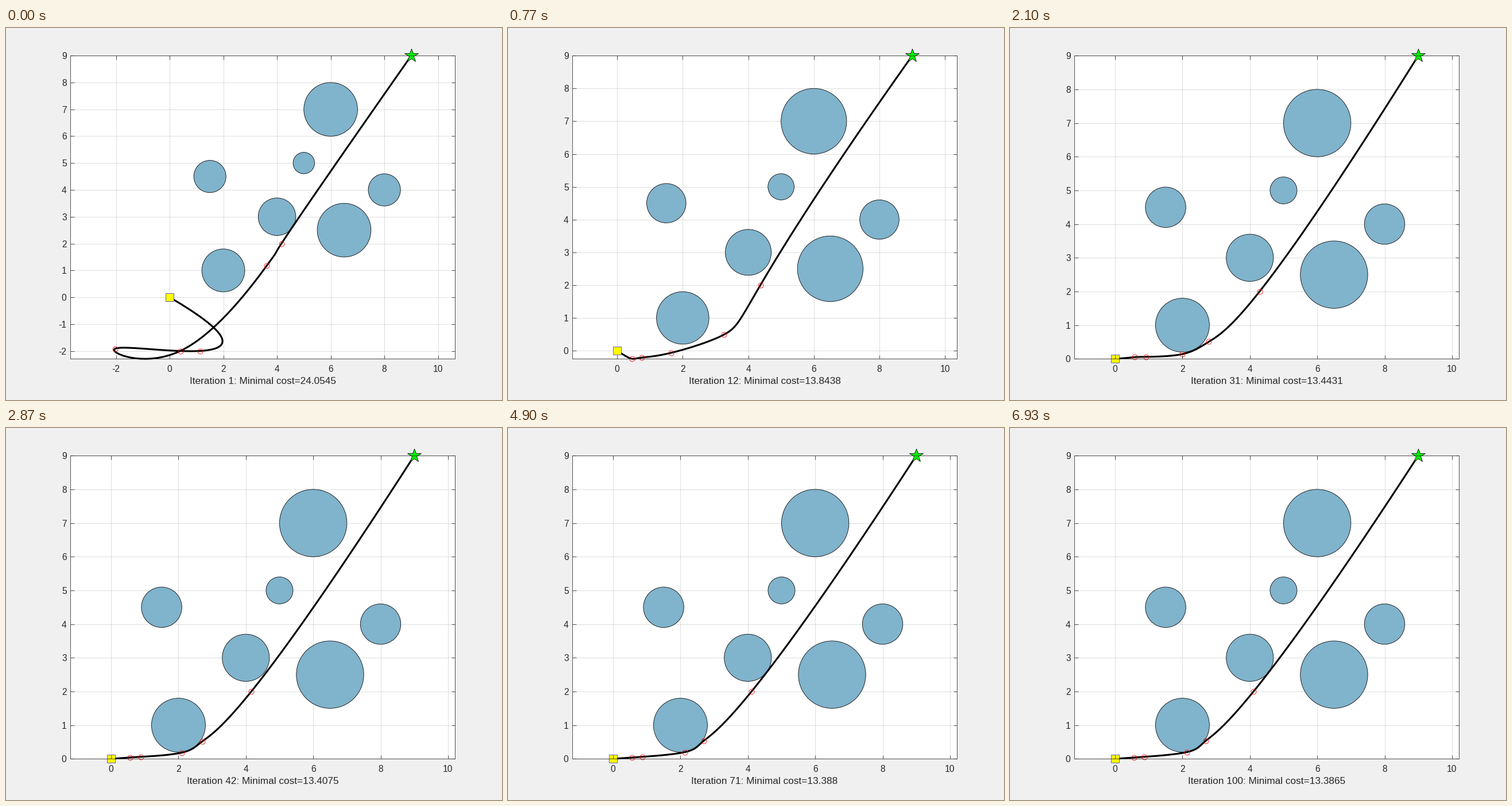
These frames come from a looping animation (864x648 px, 7 s). A matplotlib script:

```python
import numpy as np
import matplotlib.pyplot as plt
from matplotlib.animation import FuncAnimation
from matplotlib.patches import Circle
from matplotlib.ticker import FuncFormatter, MultipleLocator

W, H, DPI = 864, 648, 72  # at 72 dpi one point is one pixel
ITERATIONS, STEP_MS = 100, 70
BOX = (0.13, 0.11 + 0.4 / H, 0.775, 0.815)
ASPECT = BOX[2] * W / (BOX[3] * H)
INK = "#262626"
START, GOAL = (0, 0), (9, 9)

OBSTACLES = [
    (1.5, 4.5, 0.6), (4, 3, 0.7), (2, 1, 0.8), (5, 5, 0.4),
    (6, 7, 1.0), (6.5, 2.5, 1.0), (8, 4, 0.6),
]

# The cost decays geometrically between a few milestones.
COST_FLOOR = 13.386
MILESTONES = [1, 7, 20, 31, 55, 71, 100]
COSTS = [24.0545, 14.2409, 13.5545, 13.4431, 13.3928, 13.388, 13.3865]
LOG_EXCESS = np.log(np.array(COSTS) - COST_FLOOR)

# Handle points at the first milestones; the last pose is the settled one.
POSES = np.array([
    [(1.125, -2), (-2.04, -1.92), (0.4, -2), (3.62, 1.18), (4.165, 2)],
    [(0.4, -0.58), (0.6, -0.455), (1.76, -0.145), (3.745, 0.62), (4.485, 2)],
    [(0.48, 0), (0.85, -0.03), (1.565, -0.005), (2.91, 0.4), (4.285, 2)],
    [(0.57, 0.05), (0.92, 0.06), (1.99, 0.14), (2.785, 0.51), (4.29, 2)],
    [(0.56, 0.04), (0.86, 0.06), (2.13, 0.2), (2.685, 0.53), (4.11, 2)],
])
POSE_EXCESS = np.exp(LOG_EXCESS[:len(POSES)])


def best_at(iteration):
    """Best cost so far and its handles, which settle along with the cost."""
    excess = np.exp(np.interp(iteration, MILESTONES, LOG_EXCESS))
    tracks = POSES[::-1].reshape(len(POSES), -1).T
    flat = [np.interp(excess, POSE_EXCESS[::-1], track) for track in tracks]
    return COST_FLOOR + excess, np.reshape(flat, (-1, 2))


def spline(p, samples=100):
    """Not-a-knot cubic spline through evenly spaced knots."""
    n = len(p)
    a, rhs = np.zeros((n, n)), np.zeros(n)
    a[0, :3] = a[-1, -3:] = 1, -2, 1
    for i in range(1, n - 1):
        a[i, i - 1:i + 2] = 1, 4, 1
        rhs[i] = 6 * (p[i - 1] - 2 * p[i] + p[i + 1])
    m = np.linalg.solve(a, rhs)
    t = np.linspace(0, n - 1, samples)
    i = np.minimum(t.astype(int), n - 2)
    u = t - i
    v = 1 - u
    return (v * p[i] + u * p[i + 1]
            + ((v**3 - v) * m[i] + (u**3 - u) * m[i + 1]) / 6)


def equal_limits(x, y):
    """Tight data limits, widened so both axes share one scale."""
    height = max(np.ptp(y), np.ptp(x) / ASPECT)
    width = height * ASPECT
    xc, yc = (x.min() + x.max()) / 2, (y.min() + y.max()) / 2
    return (xc - width / 2, xc + width / 2), (yc - height / 2, yc + height / 2)


plt.rcParams["font.family"] = "Liberation Sans"
fig = plt.figure(figsize=(W / DPI, H / DPI), dpi=DPI, facecolor="#f0f0f0")
ax = fig.add_axes(BOX)
ax.set_axisbelow(False)
ax.xaxis.set_major_locator(MultipleLocator(2))
ax.yaxis.set_major_locator(MultipleLocator(1))
for axis in (ax.xaxis, ax.yaxis):
    axis.set_major_formatter(FuncFormatter(lambda v, _: str(int(round(v)))))
ax.tick_params(direction="in", length=6.5, width=0.8, color=INK,
               labelcolor=INK, labelsize=15.6, top=True, right=True)
ax.tick_params(axis="x", pad=11)
ax.tick_params(axis="y", pad=6.7)
for spine in ax.spines.values():
    spine.set(color=INK, linewidth=0.8)

# Grid lines lie under the obstacles, ticks and frame over everything.
grid = dict(color=INK, alpha=0.15, lw=1, zorder=0.5)
for gx in range(-4, 13, 2):
    ax.axvline(gx, **grid)
for gy in range(-3, 10):
    ax.axhline(gy, **grid)

for cx, cy, r in OBSTACLES:
    ax.add_patch(Circle((cx, cy), r, fc=(0.5, 0.7, 0.8), ec="black", lw=0.8))


def marks(points, shape, size, face, edge, width=0.8):
    line, = ax.plot(*np.transpose(points), shape, ms=size, mfc=face, mec=edge,
                    mew=width, clip_on=False)
    return line


path, = ax.plot([], [], "k", lw=3.1, clip_on=False)
handles = marks(POSES[0], "o", 9, "none", "red")
marks([START], "s", 13.2, "yellow", "blue", 0.6)
marks([GOAL], "*", 24.2, "lime", "black")
caption = fig.text(BOX[0] + BOX[2] / 2, 1 - 620.4 / H, "", color=INK,
                   fontsize=17.2, ha="center", va="baseline")


def update(frame):
    iteration = frame + 1
    cost, points = best_at(iteration)
    x, y = map(spline, np.vstack([START, points, GOAL]).T)
    path.set_data(x, y)
    handles.set_data(*points.T)
    xlim, ylim = equal_limits(x, y)
    ax.set_xlim(xlim)
    ax.set_ylim(ylim)
    caption.set_text(f"Iteration {iteration}: Minimal cost={cost:.6g}")
    return path, handles, caption


anim = FuncAnimation(fig, update, frames=ITERATIONS, interval=STEP_MS,
                     repeat=True, repeat_delay=0, blit=False)
plt.show()
```
